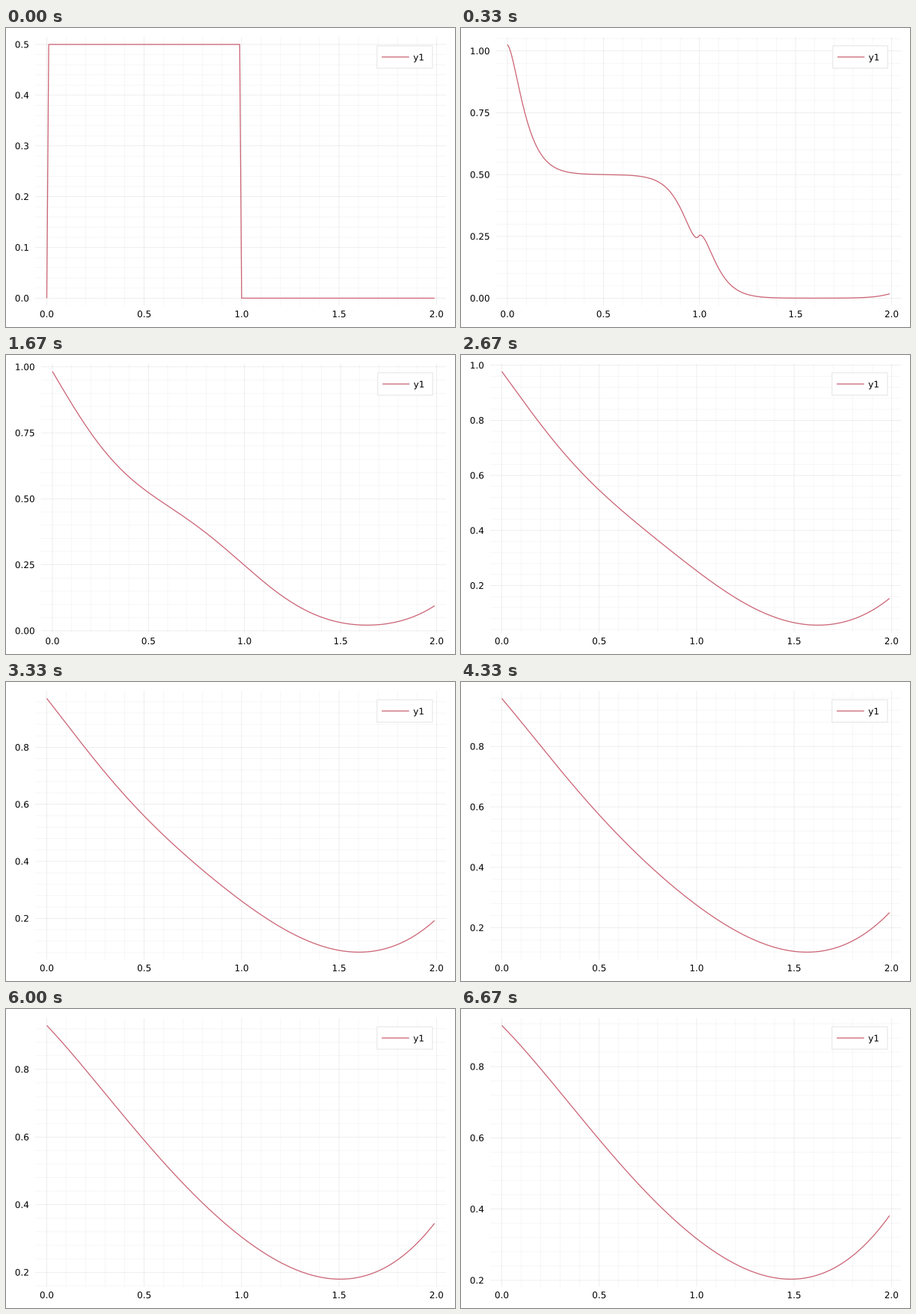
Write a matplotlib script that moves like this. It is 600 px wide and 400 px high and loops after 7.01 s.

```python
import numpy as np
import matplotlib.pyplot as plt
from matplotlib.animation import FuncAnimation
from matplotlib.collections import LineCollection
from matplotlib.patches import PathPatch, Rectangle
from matplotlib.path import Path
from matplotlib.textpath import TextPath
from matplotlib.transforms import Affine2D

W, H = 600, 400
PX = 0.72                       # points per pixel at 100 dpi
TOP, BOTTOM, RIGHT = 11.81, 371.6, 588.19
ROSE = "#CC6677"
FONT = 12
STATES, SUB = 21, 5             # time levels, animation frames per level
LOOP = 7010

DX, DT, DIFF = 0.01, 0.02, 0.5
x = np.arange(200) * DX


def solve():
    """Heat equation with cos/sin boundary values, stepped by TR-BDF2."""
    n = len(x)
    eye = np.eye(n)
    lap = DIFF / DX**2 * (np.eye(n, k=1) + np.eye(n, k=-1) - 2 * eye)

    def edge(t):
        b = np.zeros(n)
        b[0], b[-1] = np.cos(t), np.sin(t)
        return DIFF / DX**2 * b

    trap = np.linalg.inv(eye - DT / 4 * lap)
    bdf = np.linalg.inv(3 * eye - DT * lap)
    u = np.zeros(n)
    u[1:100] = 0.5
    levels = [u]
    for k in range(STATES - 1):
        t = k * DT
        mid = trap @ (u + DT / 4 * (lap @ u + edge(t) + edge(t + DT / 2)))
        u = bdf @ (4 * mid - u + DT * edge(t + DT))
        levels.append(u)
    return levels


def padded(v):
    pad = 0.03 * (v.max() - v.min())
    return v.min() - pad, v.max() + pad


def multiples(lo, hi, step):
    return range(int(np.ceil(lo / step)), int(np.floor(hi / step)) + 1)


glyphs = {}


def label(px, py, s, align):
    """Text with digits centred on py; align is the anchored share of its width."""
    if s not in glyphs:
        glyphs[s] = TextPath((0, 0), s, size=FONT, prop="DejaVu Sans")
    width = FONT * (0.636 * (len(s) - 1) + 0.318)
    shift = Affine2D().translate(px - align * width, H - py - 4.4)
    return glyphs[s].transformed(shift)


def scene(u):
    """Everything one time level shows, in stage pixels."""
    xlo, xhi = padded(x)
    ylo, yhi = padded(u)
    if yhi < 0.6:
        step, digits = 0.1, 1
    elif ylo <= 0:
        step, digits = 0.25, 2
    else:
        step, digits = 0.2, 1
    left = 38.95 if digits == 1 else 46.67
    span = RIGHT - left

    def to_x(v):
        return left + (v - xlo) / (xhi - xlo) * span

    def to_y(v):
        return H - TOP - (yhi - v) / (yhi - ylo) * (BOTTOM - TOP)

    major, minor, texts = [], [], []
    for m in multiples(xlo, xhi, 0.1):
        px = to_x(m * 0.1)
        (minor if m % 5 else major).append([(px, H - TOP), (px, H - BOTTOM)])
        if m % 5 == 0:
            texts.append(label(px, 382.5, f"{m * 0.1:.1f}", 0.5))
    for m in multiples(ylo, yhi, step / 5):
        py = to_y(m * step / 5)
        (minor if m % 5 else major).append([(left, py), (RIGHT, py)])
        if m % 5 == 0:
            texts.append(label(left - 8.05, H - py,
                               f"{m * step / 5:.{digits}f}", 1))

    # legend box, its sample line and its name, laid out from the right
    box_right = RIGHT - span / 30
    name = box_right - span / 50 - 14.7
    x2 = name - span / 100
    x1 = x2 - span / 15
    box_left = x1 - 0.0115 * span
    mid = H - TOP - (BOTTOM - TOP) / 30 - 15
    texts.append(label(name, H - mid + 0.2, "y1", 0))

    return dict(major=major, minor=minor,
                curve=(to_x(x), to_y(u)),
                box=(box_left, mid - 15, box_right - box_left, 30),
                sample=([x1, x2], [mid, mid]),
                text=Path.make_compound_path(*texts))


scenes = [scene(u) for u in solve()]

fig = plt.figure(figsize=(W / 100, H / 100), dpi=100, facecolor="white")
ax = fig.add_axes([0, 0, 1, 1])
ax.set_xlim(0, W)
ax.set_ylim(0, H)
ax.axis("off")
ax.set_autoscale_on(False)


def grid(alpha):
    lines = LineCollection([], colors=[(0, 0, 0, alpha)],
                           linewidths=0.65 * PX, snap=False, zorder=1)
    return ax.add_collection(lines, autolim=False)


def stroke(z):
    return ax.plot([], [], color=ROSE, lw=1.3 * PX, snap=False, zorder=z,
                   solid_joinstyle="round", solid_capstyle="butt")[0]


minor, major = grid(0.05), grid(0.1)
curve, sample = stroke(3), stroke(5)
box = ax.add_patch(Rectangle((0, 0), 1, 1, fc="white", ec="#e4e4e4",
                             lw=PX, snap=False, zorder=4))
text = ax.add_patch(PathPatch(scenes[0]["text"], fc="black", lw=0, zorder=6))


def draw(i):
    s = scenes[min((i + 1) // SUB, STATES - 1)]
    minor.set_segments(s["minor"])
    major.set_segments(s["major"])
    curve.set_data(*s["curve"])
    sample.set_data(*s["sample"])
    box.set_bounds(*s["box"])
    text.set_path(s["text"])
    return []


frames = STATES * SUB
anim = FuncAnimation(fig, draw, frames=frames, init_func=lambda: draw(0),
                     interval=LOOP / frames, repeat=True, repeat_delay=0,
                     blit=False)
plt.show()
```
